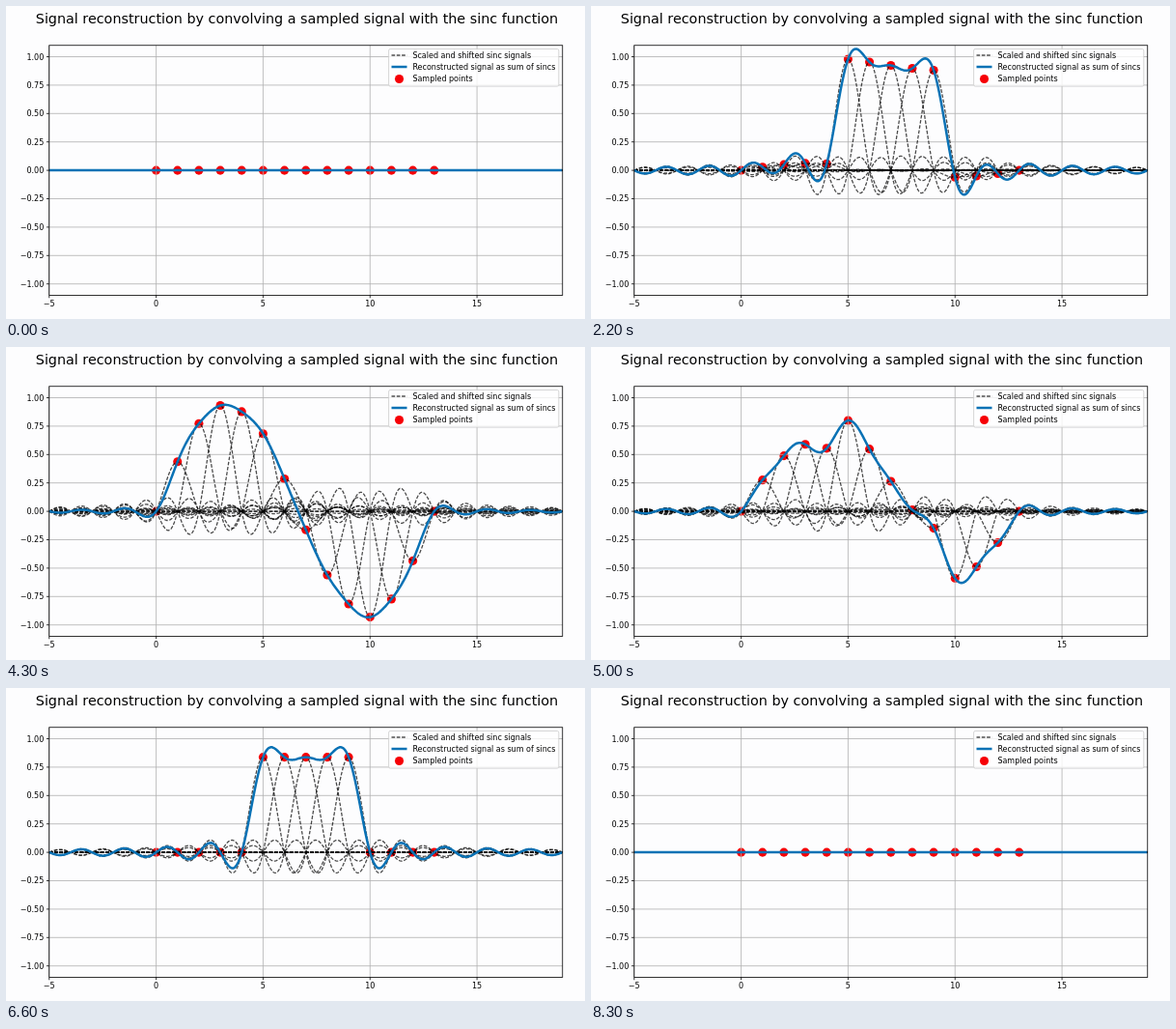
Recreate the animation shown at these times as an HTML page. Size 600 px wide and 324 px high, loop 8.4 s.

```html
<!DOCTYPE html>
<html lang="en">
<head>
<meta charset="utf-8">
<title>Sinc reconstruction</title>
<style>
  html, body { margin: 0; width: 100%; height: 100%; overflow: hidden; background: #fdfdfe; }
  svg { display: block; width: 600px; height: 324px; }
  text { font: 8px "DejaVu Sans", sans-serif; fill: #000; }
  .title { font-size: 14.34px; text-anchor: middle; }
  .grid { stroke: #b0b0b0; stroke-width: .8; }
  .axis { stroke: #000; stroke-width: .8; fill: none; }
  .sinc { stroke: #000; stroke-opacity: .7; stroke-width: 1.3; stroke-dasharray: 3.7 1.6; fill: none; }
  .sum { stroke: #0a72b5; stroke-width: 2.5; fill: none; stroke-linejoin: round; }
  .dot { fill: #f60006; }
</style>
</head>
<body>
<svg id="plot" viewBox="0 0 600 324">
  <clipPath id="area"><rect x="44.75" y="40.75" width="532" height="258.7"/></clipPath>
</svg>
<script>
const FRAME_MS = 100, FRAME_COUNT = 84, SAMPLE_COUNT = 14;
const X_MIN = -5, X_MAX = 19, STEP = 0.05;
const LEFT = 44.75, RIGHT = 576.75, TOP = 40.75, BOTTOM = 299.45;
const DOT_RADIUS = 4.55;
const BLEND_FRAMES = 20.3;
const STARTS = [0.15, 20.75, 41.75, 62.7];

const px = x => LEFT + (x - X_MIN) * (RIGHT - LEFT) / (X_MAX - X_MIN);
const py = y => (TOP + BOTTOM) / 2 - y * (BOTTOM - TOP) / 2.2;
const sinc = x => Math.abs(x) < 1e-9 ? 1 : Math.sin(Math.PI * x) / (Math.PI * x);

const svg = document.getElementById('plot');
function add(tag, attrs, parent = svg) {
  const node = document.createElementNS(svg.namespaceURI, tag);
  for (const key in attrs) node.setAttribute(key, attrs[key]);
  parent.append(node);
  return node;
}
const line = (cls, x1, y1, x2, y2) => add('line', { class: cls, x1, y1, x2, y2 });
function label(text, x, y, anchor = 'start', cls = '') {
  add('text', { x, y, class: cls, 'text-anchor': anchor }).textContent = text;
}

const indices = Array.from({ length: SAMPLE_COUNT }, (_, n) => n);
const xs = Array.from({ length: Math.round((X_MAX - X_MIN) / STEP) + 1 }, (_, i) => X_MIN + i * STEP);
const kernels = indices.map(n => xs.map(x => sinc(x - n)));

// Signals the samples blend through, in order
const zero = indices.map(() => 0);
const pulse = indices.map(n => n >= 5 && n <= 9 ? 1 : 0);
const sine = indices.map(n => Math.sin(2 * Math.PI * n / 13));
const signals = [zero, pulse, sine, pulse, zero];

// Static axes, with the points beneath the grid and the curves above it
const dots = indices.map(n => add('circle', { class: 'dot', cx: px(n), r: DOT_RADIUS }));
const xTicks = [-5, 0, 5, 10, 15];
const yTicks = Array.from({ length: 9 }, (_, i) => 1 - i / 4);
xTicks.forEach(x => line('grid', px(x), TOP, px(x), BOTTOM));
yTicks.forEach(y => line('grid', LEFT, py(y), RIGHT, py(y)));

const curves = add('g', { 'clip-path': 'url(#area)' });
const sincPaths = indices.map(() => add('path', { class: 'sinc' }, curves));
const sumPath = add('path', { class: 'sum' }, curves);

add('rect', { class: 'axis', x: LEFT, y: TOP, width: RIGHT - LEFT, height: BOTTOM - TOP });
const signed = text => text.replace('-', '\u2212');
xTicks.forEach(x => {
  line('axis', px(x), BOTTOM, px(x), BOTTOM + 2.8);
  label(signed(String(x)), px(x), 311.4, 'middle');
});
yTicks.forEach(y => {
  line('axis', LEFT - 2.8, py(y), LEFT, py(y));
  label(signed(y.toFixed(2)), 39.3, py(y) + 3, 'end');
});
label('Signal reconstruction by convolving a sampled signal with the sinc function',
  301.5, 17.8, 'middle', 'title');

add('rect', { x: 396.6, y: 44.5, width: 176.2, height: 38.6, rx: 1.6,
  fill: '#fff', 'fill-opacity': .8, stroke: '#ccc', 'stroke-width': .8 });
line('sinc', 399.5, 51, 415.5, 51);
line('sum', 399.5, 63, 415.5, 63);
add('circle', { class: 'dot', cx: 407.5, cy: 75.5, r: DOT_RADIUS });
['Scaled and shifted sinc signals', 'Reconstructed signal as sum of sincs', 'Sampled points']
  .forEach((text, i) => label(text, 421.4, 53.8 + 12 * i));

function samplesAt(frame) {
  const stage = Math.max(0, STARTS.filter(start => start <= frame).length - 1);
  const mix = Math.min(1, Math.max(0, (frame - STARTS[stage]) / BLEND_FRAMES));
  return indices.map(n => signals[stage][n] * (1 - mix) + signals[stage + 1][n] * mix);
}

const pathOf = values =>
  'M' + values.map((y, i) => px(xs[i]).toFixed(2) + ' ' + py(y).toFixed(2)).join('L');

let shown = -1;
function draw() {
  const frame = Math.floor(performance.now() / FRAME_MS) % FRAME_COUNT;
  if (frame !== shown) {
    shown = frame;
    const samples = samplesAt(frame);
    const total = xs.map(() => 0);
    samples.forEach((value, n) => {
      const curve = kernels[n].map(k => k * value);
      curve.forEach((y, i) => total[i] += y);
      sincPaths[n].setAttribute('d', pathOf(curve));
      dots[n].setAttribute('cy', py(value));
    });
    sumPath.setAttribute('d', pathOf(total));
  }
  requestAnimationFrame(draw);
}
draw();
</script>
</body>
</html>
```
